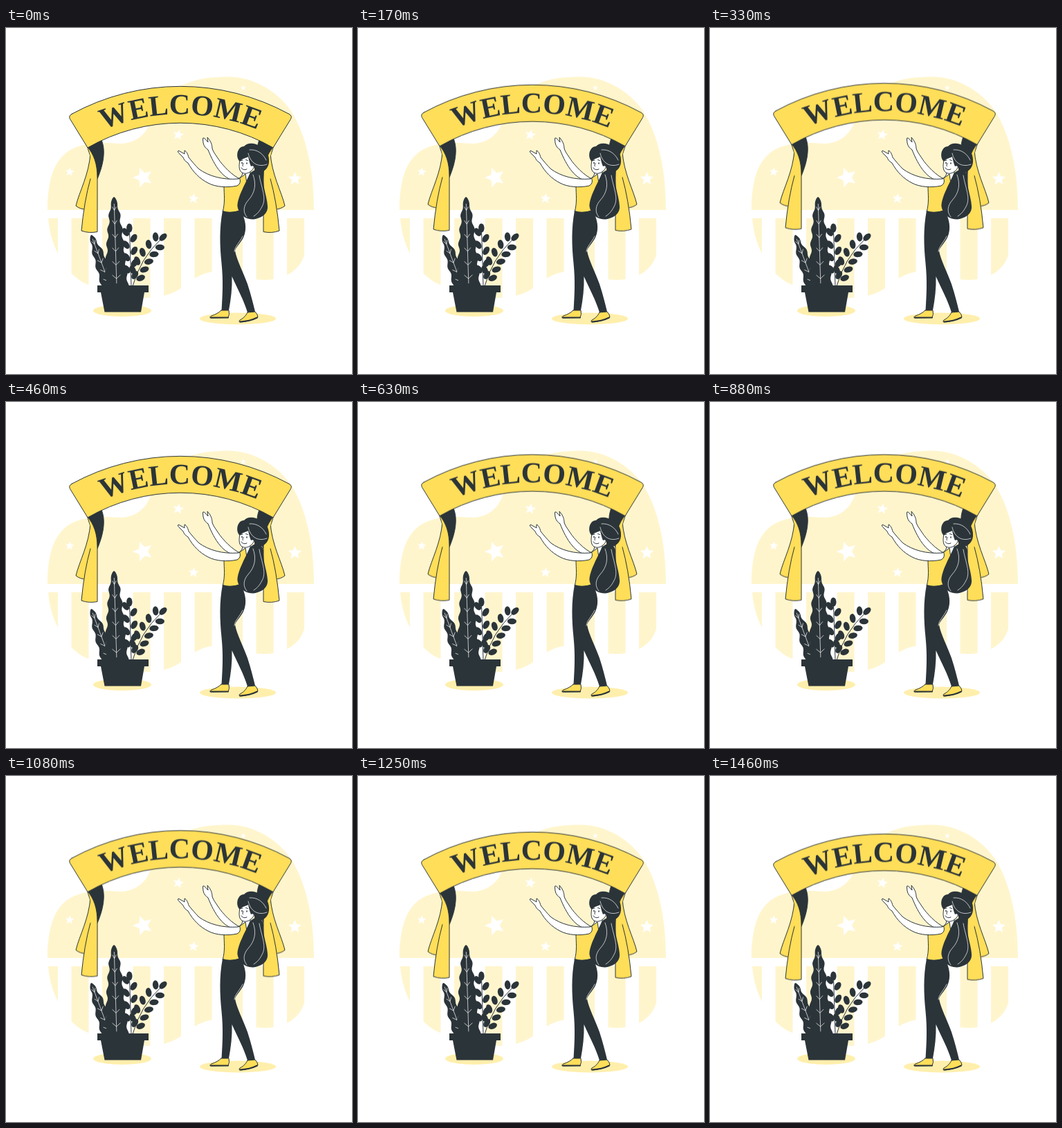
Animation, 500 px wide and 500 px high, one loop 1500 ms. Source, as an HTML page:

```html
<!DOCTYPE html>
<html lang="en">
<head>
<meta charset="utf-8">
<title>Welcome</title>
<style>
  html, body { margin: 0; width: 100%; height: 100%; overflow: hidden; background: #fff; }
  svg { display: block; width: 100vw; height: 100vh; }
  .cream { fill: #fff5cd; }
  .shade { fill: #ffefac; }
  .dark { fill: #2b3439; }
  .gold { fill: #ffde59; }
  .skin { fill: #fff; }
  .ink { stroke: #2b3439; stroke-width: 1; stroke-linejoin: round; stroke-linecap: round; }
  .line { fill: none; }
  .light { fill: none; stroke: #fff; stroke-width: .7; stroke-linecap: round; stroke-linejoin: round; }
  text { font: 700 42px "Liberation Serif", serif; fill: #2b3439; text-anchor: middle; }
</style>
</head>
<body>
<svg viewBox="0 0 500 500">
  <defs>
    <path id="baseline" d="M112 161A287 287 0 0 1 392 161"/>
    <clipPath id="fence">
      <path d="M61 275C63 298 68 312 76 328C84 345 100 364 119 371C145 380 170 389 205 390C232 389 248 381 262 369C276 357 296 350 316 351C334 354 347 363 370 364C400 365 424 352 431 328V275Z"/>
    </clipPath>
    <g id="tail">
      <path class="dark ink" d="M118 172L138 162C143 174 143 192 132 218L124 192Z"/>
      <path class="gold ink" d="M122 181C120 212 106 236 101 257Q107 262 116 262L127 216Z"/>
      <path class="gold" d="M118 172C127 183 132 196 132 216V294.500Q120 297 109 293Q113 250 121 218C124 205 125 190 118 172Z"/>
      <path class="line ink" d="M118 172C127 183 132 196 132 216V294.500Q120 297 109 293Q113 250 122 218"/>
    </g>
  </defs>

  <path class="cream" d="M60 263C60 222 68 182 105 171C136 161 157 169 172 166.500C193 163 202 151 208 138C219 110 235 91 256 82C278 72 300 70.500 322 70.500C358 71 392 91 412 120C433 153 445 203 445 263Z"/>
  <g id="stars" fill="#fff"></g>
  <g id="stripes" class="cream" clip-path="url(#fence)"></g>
  <ellipse class="shade" cx="168" cy="408.500" rx="42" ry="8.500"/>
  <ellipse class="shade" cx="335" cy="420" rx="55" ry="8.500"/>

  <g id="plant"></g>
  <path class="dark" d="M132 372H206V382H200L195 410.500H142.500L137 382H132Z"/>

  <g id="banner">
    <use href="#tail"/>
    <use href="#tail" transform="matrix(-1 0 0 1 504 0)"/>
    <path class="gold ink" d="M95 124.300A328 328 0 0 1 409 124.300Q414 127 411.500 131.500L386 173A269 269 0 0 0 118 173L92.500 131.500Q90 127 95 124.300Z"/>
    <text><textPath href="#baseline" startOffset="50%">WELCOME</textPath></text>
  </g>

  <g id="woman">
    <path class="skin ink" d="M338 218C328 214 313 199 306 188C302 182 299 178 298 174C298 168 295 162 291 158L292 165L286.500 159Q284 158 284.500 161L285 166C286 171 289 174 292 176C296 186 302 199 310 208C315 214 322 219 330 221Z"/>
    <path class="skin ink" d="M343 205L341 213Q338 218 333 219L350 222L354 205Z"/>
    <path class="gold ink" d="M316 224C326 223 334 221 338 217L346 211L349 232C342 241 339 252 339 264Q323 269 313 266C317 252 315 240 315 229Z"/>
    <path class="skin ink" d="M336 218C313 220 293 214 279 204C273 198 268 192 264 187C263 183 261 178 258 177L258 182L250 177.500Q247 177 249.500 180.500L256 187C258 192 260 193 263 195C270 208 280 218 292 224C303 230 320 231 334 228Q340 225 338 218"/>
    <path class="dark" d="M313 264Q324 268 339 263C346 276 349 290 343 303C338 312 332 317 331 322C334 337 343 353 349 370C354 385 357 398 360 410Q354 413 349 411C344 394 335 378 326.500 359C327 376 325 392 322 408H311.500C313 385 314 365 311.500 340C309 315 308 290 313 264Z"/>
    <path class="light" d="M342 301C337 311 331 315 330 323"/>
    <path class="gold ink" d="M311 408H322Q323.500 414 321 418.500L297 419Q293 418 297 416C303 414 308 411 311 408Z"/>
    <path class="gold ink" d="M349 411L360 410Q364 414 364 418Q352 424 340 425Q335 425 338 422C344 419 347 415 349 411Z"/>
    <path class="line ink" style="stroke-width:2" d="M295.500 418.600H321M338 424.500Q352 424 363 418.500"/>
    <path class="dark" d="M352 211C346 225 334 245 334.500 258C336 268 345 277 357 276.500C370 275 379 268 378 257C377 242 371 232 372 214C369 203 358 203 352 211Z"/>
    <path class="skin ink" d="M339 186C337 195 335 205 341 209C347 212.500 355 208 358 202L361 188L347 179Z"/>
    <path class="dark" d="M338 193C331 187 334 171 344 171C348 166 358 165 365 170C375 171 381 183 380 194C379 204 371 211 358 210C361 203 358 197 354 200C352 195 351 191 350 186C347 188 342 188 338 193Z"/>
    <path class="light" d="M350 181C353 195 364 202 377 197M352 176C363 175 372 182 376 191M357 212C362 226 360 238 350 249C343 257 342 266 348 273M366 213C369 231 377 246 370 258C367 264 364 268 358 272"/>
    <path class="line ink" d="M340 202Q343 206.500 348 204M343 195.500Q341 199 342.500 200M339.500 191.500L342 191M346.500 190.500L349.500 191.500"/>
    <ellipse class="dark" cx="341" cy="195" rx=".8" ry="1.300"/>
    <ellipse class="dark" cx="348" cy="195.500" rx=".8" ry="1.300"/>
  </g>
</svg>
<script>
const LOOP = 1500, FPS = 24, LIFT = 10;
const $ = id => document.getElementById(id);

function add(parent, tag, attrs) {
  const el = document.createElementNS('http://www.w3.org/2000/svg', tag);
  for (const key in attrs) el.setAttribute(key, attrs[key]);
  return parent.appendChild(el);
}

function star(x, y, r, turn) {
  const points = Array.from({ length: 10 }, (_, i) => {
    const a = turn + i * Math.PI / 5, d = i % 2 ? r * .45 : r;
    return [x + d * Math.sin(a), y - d * Math.cos(a)].map(n => n.toFixed(2));
  });
  add($('stars'), 'polygon', { points: points.join(' ') });
}

// Wavy leaf along a straight rib from tip to base.
function leaf(tip, base, width, veins) {
  const dx = base[0] - tip[0], dy = base[1] - tip[1], len = Math.hypot(dx, dy);
  const at = (t, side) => [
    tip[0] + dx * t - dy / len * side,
    tip[1] + dy * t + dx / len * side
  ].map(n => n.toFixed(2)).join(' ');
  const right = [], left = [];
  for (let i = 0; i <= 80; i++) {
    const t = i / 80;
    const half = width * Math.sqrt(t) + 1.3 * Math.min(1, t * 6) * Math.sin(t * len / 3.3);
    right.push(at(t, -half));
    left.unshift(at(t, half));
  }
  add($('plant'), 'path', { class: 'dark', d: `M${right.concat(left).join('L')}Z` });
  let d = `M${at(.08, 0)}L${at(.96, 0)}`;
  for (let i = 1; i <= veins; i++) {
    const t = i / (veins + .6), w = 2 + 4 * t, up = t - 5 / len;
    d += `M${at(up, -w)}L${at(t, 0)}L${at(up, w)}`;
  }
  add($('plant'), 'path', { class: 'light', d });
}

// Curved stem with oval leaves on alternating sides.
function sprig(a, b, c, count, spread) {
  const bez = (t, k) => (1 - t) ** 2 * a[k] + 2 * t * (1 - t) * b[k] + t * t * c[k];
  const oval = (x, y, angle) => add($('plant'), 'ellipse', {
    class: 'dark', rx: 6.6, ry: 4.2,
    transform: `translate(${x} ${y}) rotate(${angle * 180 / Math.PI})`
  });
  add($('plant'), 'path', { class: 'line ink', d: `M${a}Q${b} ${c}` });
  for (let i = 0; i < count; i++) {
    const t = .1 + .78 * i / (count - 1), side = i % 2 ? -1 : 1;
    const dir = Math.atan2(bez(t + .01, 1) - bez(t, 1), bez(t + .01, 0) - bez(t, 0));
    const angle = dir + side * spread;
    oval(bez(t, 0) + 10 * Math.cos(angle), bez(t, 1) + 10 * Math.sin(angle), angle);
  }
  const end = Math.atan2(c[1] - b[1], c[0] - b[0]);
  oval(c[0] + 4 * Math.cos(end), c[1] + 4 * Math.sin(end), end);
}

star(92, 208, 6.5, .1);
star(198, 216, 15, -.33);
star(249, 154.5, 8, .2);
star(271, 246.5, 7.5, .1);
star(417.5, 218, 10, 0);
star(343, 86.5, 4, .1);

for (let i = 0; i < 9; i++)
  add($('stripes'), 'rect', { x: 50 + 44.5 * i, y: 275, width: 25, height: 120 });

sprig([181, 373], [180, 335], [178.5, 293], 8, .6);
sprig([183, 373], [194, 333], [224, 305], 10, .85);
leaf([123, 299], [151, 374], 12, 5);
leaf([156, 244], [160, 374], 16.5, 6);

// Banner rises and sinks at constant speed, in steps of one picture.
const easing = `steps(${LOOP * FPS / 2000}, end)`;
$('banner').animate([
  { transform: 'translateY(0px)', easing },
  { transform: `translateY(${-LIFT}px)`, easing },
  { transform: 'translateY(0px)' }
], { duration: LOOP, iterations: Infinity, delay: -4 });
</script>
</body>
</html>
```
